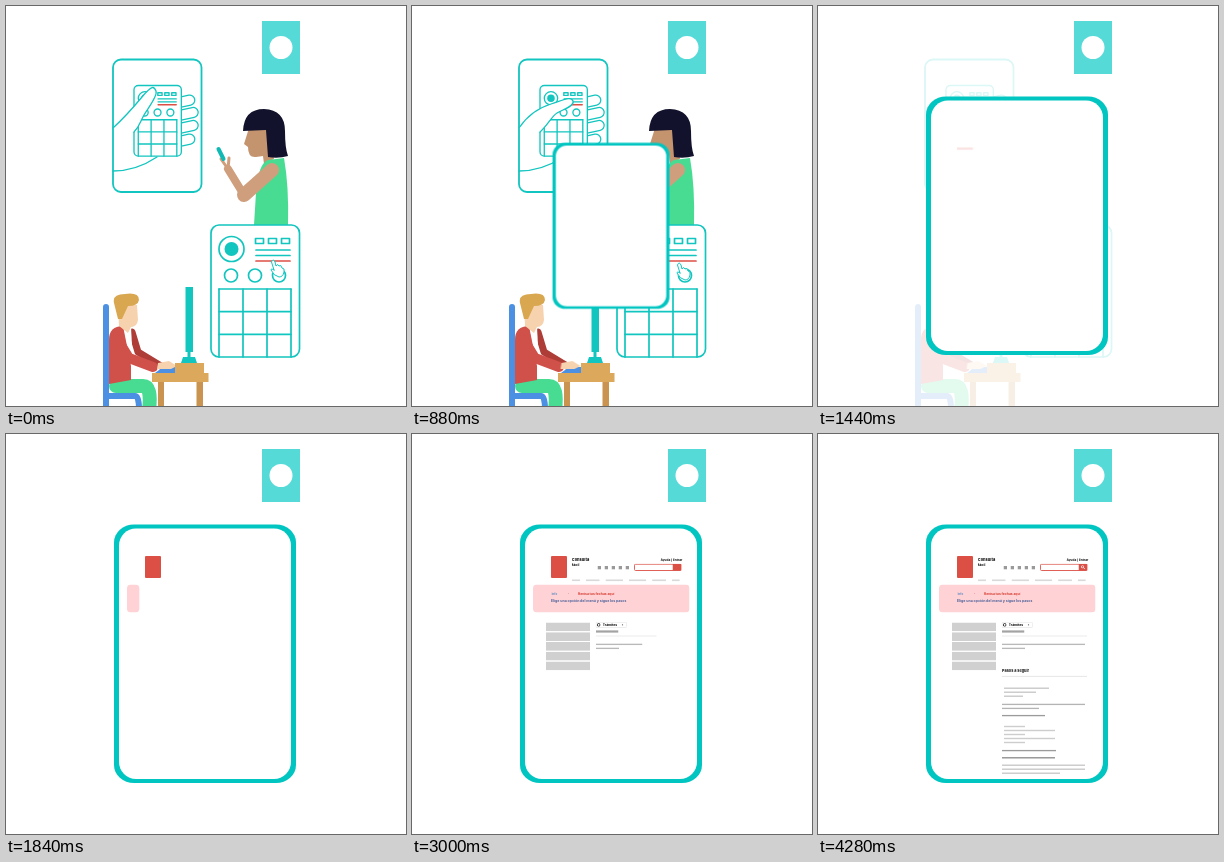
Write an HTML page that moves like this. It is 400 px wide and 400 px high and loops after 4.32 s.

```html
<!DOCTYPE html>
<html lang="es">
<head>
<meta charset="utf-8">
<title>Portal en pantalla</title>
<style>
html, body { margin: 0; width: 100%; height: 100%; overflow: hidden; background: #fff; }
svg { display: block; width: 100vw; height: 100vh; }
text { font-family: Inter, "Open Sans", sans-serif; font-weight: 800; }

.line { fill: none; stroke: #12c5bf; stroke-linejoin: round; stroke-linecap: round; }
.limb { fill: none; stroke-linejoin: round; stroke-linecap: round; }
.paper { fill: #fff; }
.teal { fill: #12c5bf; }
.wood { fill: #dca85c; }

#scene, #thumb, #pointer, #hands, #screen, #badge { animation: 4320ms linear infinite; }
#scene { animation-name: fade; }
#thumb { animation-name: tap; }
#pointer { animation-name: press; }
#hands { animation-name: type; }
#screen { animation-name: grow; transform-origin: 199px 220px; }
#badge { animation-name: rise; transform-origin: 147px 144px; }

@keyframes fade {
  0%, 23.15% { opacity: 1; }
  35.19%, 100% { opacity: 0; }
}
@keyframes tap {
  0%, .926% { d: path("M107 122C118 112 126 103 136 91S148 80 150 85S142 102 138 109S134 120 128 126"); }
  7.407%, 100% { d: path("M107 122C115 110 126 102 139 98S159 90 161 95S150 104 145 107S135 120 128 126"); }
}
@keyframes press {
  0%, .926% { transform: none; }
  7.407%, 100% { transform: translateY(3px); }
}
@keyframes type {
  0%, .926% { transform: none; }
  7.407%, 100% { transform: translateX(-2.5px); }
}
@keyframes grow {
  0%, 13.88% { transform: scale(0); }
  13.889% { transform: scale(.12); animation-timing-function: cubic-bezier(.39, .575, .565, 1); }
  30.56%, 100% { transform: scale(1); }
}
@keyframes rise {
  0%, 32.4% { transform: scaleY(0); opacity: .05; }
  40.74%, 100% { transform: scaleY(1); opacity: 1; }
}
</style>
</head>
<body>
<svg viewBox="0 0 400 400">
  <defs><g id="phone"></g></defs>

  <rect x="256" y="15" width="38" height="53" fill="#55dad8"/>
  <circle cx="275" cy="41.5" r="11.5" fill="#fff"/>

  <g id="scene">
    <!-- phone in hand -->
    <g class="line" stroke-width="1.3">
      <rect x="107" y="53.5" width="88.5" height="132.5" rx="8" stroke-width="1.8"/>
      <path d="M107 165Q130 165 151 151"/>
      <g id="fingers"></g>
      <use href="#phone" transform="translate(128 79.5) scale(.535)" stroke-width="2.5"/>
      <path id="thumb" class="paper" d="M107 122C118 112 126 103 136 91S148 80 150 85S142 102 138 109S134 120 128 126"/>
    </g>

    <!-- woman -->
    <path fill="#c4946f" d="M243 122L238 138L242 141Q242 152 250 151L257 150L258 158L268 153L263 122Z"/>
    <path fill="#47dc92" d="M248 219L250 187Q252 158 262 154L278 152Q283 180 282 219Z"/>
    <path fill="#12122c" d="M237 125Q238 103 258 103Q279 104 279 125Q279 142 282 150Q272 153 262 151L260 124Z"/>
    <g class="limb" stroke="#cf9f7d">
      <path d="M266 164L238 189" stroke-width="14"/>
      <path d="M238 189L222 163" stroke-width="8"/>
      <path d="M223 152L222 163L215 153" stroke-width="3"/>
    </g>
    <path class="limb" d="M212.5 143L217.5 153" stroke="#11b9b4" stroke-width="4"/>

    <!-- large phone -->
    <g class="line" stroke-width="1.7">
      <use href="#phone" transform="translate(205 219)"/>
      <path id="pointer" class="paper" stroke-width="1" d="M268 264L265.500 256Q267 252 269 256L270 260Q272 257 273 260Q275 258 276 262Q279 262 278 266Q277 271 273 271Q268 270 265 264Q265 262 268 264Z"/>
    </g>

    <!-- man at desk -->
    <g class="limb">
      <path d="M100 301V403M103 390H129Q133 390 133 403" stroke="#4b90e3" stroke-width="6"/>
      <path d="M110 380H137Q146 380 143 404" stroke="#47dc92" stroke-width="14"/>
      <path d="M126 326L132 346L155 360" stroke="#ae3c37" stroke-width="7"/>
      <path fill="#fff" d="M117 321H125L127 358H120Z"/>
      <path fill="#d0504a" d="M103 378V334Q103 320 117 320L125 360V374Z"/>
      <path d="M112 334L123 352L147 361" stroke="#d0504a" stroke-width="10"/>
    </g>
    <path fill="#f6d3ae" d="M112 299H131L132 314Q131 321 125 321L122 327L113 320Z"/>
    <path fill="#d9a750" d="M108 297Q106 288 119 288Q133 286 133 294Q132 300 122 300L116 313H112Z"/>
    <path fill="#4b90e3" d="M149 367L157 361H172V367Z"/>
    <path id="hands" fill="#f6d3ae" d="M152 357L163 355L171 360L165 363H151Z"/>
    <path class="wood" d="M169 357h29v10h-29zM146 367h56.500v9H146z"/>
    <path fill="#ca9350" d="M152 376h6v24h-6zM190.500 376h6.500v24h-6.500z"/>
    <path class="teal" d="M179.500 281h7.500v65h-7.500zM181.500 346h3v6h-3zM177 351h12l2 6h-16z"/>
  </g>

  <g id="screen">
    <rect x="108" y="90.5" width="182" height="258.500" rx="20" ry="18" fill="#00c5c0"/>
    <rect x="113" y="94.5" width="172" height="250.500" rx="17" fill="#fff"/>
  </g>
  <rect id="badge" x="139" y="122" width="16" height="22" rx="1" fill="#dc4f45"/>
  <g id="page"></g>
</svg>
<script>
const LOOP = 4320;
const SPEED = 0.28; // px per ms at which lines are drawn
const RED = '#dc4f45';
const byId = id => document.getElementById(id);
const page = byId('page');

function draw(parent, tag, attrs) {
  const el = document.createElementNS('http://www.w3.org/2000/svg', tag);
  for (const key in attrs) el.setAttribute(key, attrs[key]);
  return parent.appendChild(el);
}

// Phone outline with its buttons and keypad
function drawPhone(phone) {
  const w = 88.5, h = 132;
  draw(phone, 'rect', { width: w, height: h, rx: 8, class: 'paper' });
  draw(phone, 'circle', { cx: 20.5, cy: 24, r: 12.5 });
  draw(phone, 'circle', { cx: 20.5, cy: 24, r: 7, class: 'teal', stroke: 'none' });
  for (let i = 0; i < 3; i++) {
    draw(phone, 'rect', { x: 44.5 + 13 * i, y: 13.5, width: 8, height: 5 });
    draw(phone, 'path', { d: `M45 ${25 + 5.5 * i}h34`, ...(i === 2 && { stroke: RED }) });
    draw(phone, 'circle', { cx: 20 + 24 * i, cy: 50.5, r: 6.5 });
    draw(phone, 'path', { d: `M8 ${64 + 22.7 * i}h72` });
  }
  for (let i = 0; i < 4; i++) draw(phone, 'path', { d: `M${8 + 24 * i} 64V${h}` });
}

drawPhone(byId('phone'));
for (let i = 0; i < 4; i++) {
  const y = 91 + 13 * i, width = 27 + 4 * Math.sin(i * Math.PI / 3);
  draw(byId('fingers'), 'rect', { x: 162, y, width, height: 10, rx: 5, transform: `rotate(-12 175 ${y + 5})` });
}

// Uncovers a part from left to right.
function reveal(el, start, length, round = 0) {
  const shut = `inset(0 100% 0 0 round ${round}px)`;
  const open = `inset(0 0% 0 0 round ${round}px)`;
  el.animate([
    { clipPath: shut, offset: 0 },
    { clipPath: shut, offset: start / LOOP },
    { clipPath: open, offset: (start + length) / LOOP },
    { clipPath: open, offset: 1 }
  ], { duration: LOOP, iterations: Infinity });
}

function add(tag, attrs, start, length, round) {
  const el = draw(page, tag, attrs);
  reveal(el, start, length, round);
  return el;
}

function bar(x, y, width, height, fill, start, length = width / SPEED, round = 0) {
  add('rect', { x, y, width, height, fill }, start, length, round);
}

function label(str, x, y, size, fill, start, length) {
  add('text', { x, y, 'font-size': size, fill }, start, length).textContent = str;
}

// Banner and side menu
bar(121, 150.5, 156.5, 28, '#ffd3d5', 1800, 520, 4);
for (let i = 0; i < 5; i++) bar(134, 188.5 + i * 9.75, 44, 8.8, '#d0d0d0', 2200, 270);

// Header
label('Consulta', 159.8, 127.4, 3.9, '#111', 2200, 260);
label('fácil', 159.8, 132.2, 3.6, '#111', 2260, 160);
label('Ayuda | Entrar', 248.5, 127.4, 3.1, '#222', 2560, 200);
for (let i = 0; i < 5; i++) bar(185.5 + i * 7, 132, 3.6, 3.6, '#999', 2400 + i * 40, 60);
for (let i = 0, x = 160; i < 6; i++) {
  const w = 8 + 10 * Math.sin(i * Math.PI / 5);
  bar(x, 145.3, w, 2, '#d9d9d9', 2420 + i * 50, 100);
  x += w + 5.8;
}

// Search field
add('rect', { x: 222.5, y: 130.2, width: 46.5, height: 6.3, rx: 1, fill: '#fff', stroke: RED, 'stroke-width': 0.9 }, 2480, 240);
bar(260.5, 130, 9, 6.7, RED, 2680, 60);
add('circle', { cx: 264.6, cy: 132.8, r: 1.2, fill: 'none', stroke: '#fff', 'stroke-width': 0.8 }, 3080, 80);
add('path', { d: 'M265.500 133.600l1.300 1.400', stroke: '#fff', 'stroke-width': 0.8 }, 3080, 80);

// Banner text
label('Info', 139.5, 161.3, 3, '#6b8fc4', 2300, 100);
label('·', 156, 161.3, 4, '#c33', 2250, 60);
label('Revisa tus fechas aquí', 166, 161.3, 3.3, '#d9483f', 2250, 300);
label('Elige una opción del menú y sigue los pasos', 139, 168, 3.5, '#5c6ba0', 2320, 340);

// Breadcrumb
add('rect', { x: 184, y: 188.2, width: 30.5, height: 5.4, rx: 1, fill: '#fff', stroke: '#ddd', 'stroke-width': 0.6 }, 2600, 110);
add('circle', { cx: 186.7, cy: 190.9, r: 1.4, fill: 'none', stroke: '#222', 'stroke-width': 0.9 }, 2620, 40);
label('Trámites', 190.8, 192.2, 3.3, '#222', 2640, 110);
add('circle', { cx: 210.5, cy: 190.9, r: 0.8, fill: '#888' }, 2720, 40);
bar(184, 196.2, 22.5, 2.6, '#a3a3a3', 2720);

// Article: each row starts by its height on the page, a little slower further down.
const LEFT = 184, FULL = 84, STEP = 4;
function startAt(y) {
  const d = y - 202;
  return 2785 + 6 * d + 0.015 * d * d;
}
const row = (x, y, w, fill, h = 1.8) => bar(x, y - h / 2, w, h, fill, startAt(y));
const rule = y => row(LEFT, y, FULL + 1, '#d6d6d6', 1);

function paragraph(y, count, lastWidth, fill) {
  for (let i = 0; i < count; i++) {
    row(LEFT, y + i * STEP, i < count - 1 ? FULL - 1 : lastWidth, fill);
  }
}

function list(y, count, widthOf) {
  for (let i = 0; i < count; i++) row(LEFT + 2, y + i * STEP, widthOf(i), '#cdcdcd');
}

rule(202);
paragraph(210.3, 2, 23, '#b9b9b9');
label('Pasos a seguir', LEFT, 238.4, 3.8, '#222', startAt(238), 110);
rule(242.2);
list(254.2, 3, i => 45 - 13 * i);
paragraph(270.4, 2, 37, '#b4b4b4');
paragraph(281.6, 1, 43, '#9b9b9b');
list(292.5, 5, i => i % 2 ? 51 : 21);
paragraph(316.6, 1, 54, '#9b9b9b');
paragraph(323.8, 1, 53, '#9b9b9b');
paragraph(331.2, 3, 58, '#cdcdcd');
</script>
</body>
</html>
```
